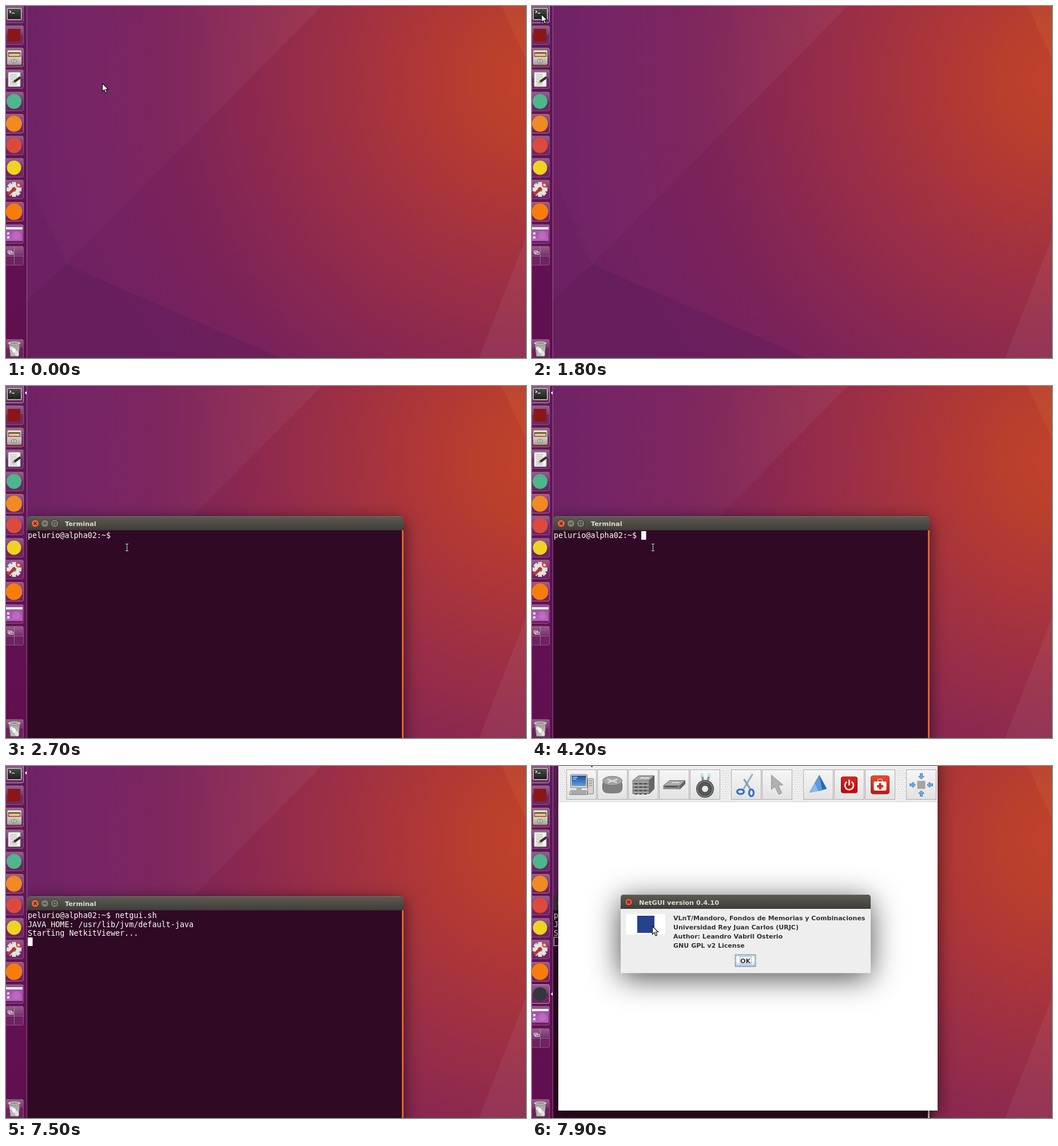
An HTML page with a canvas that plays this animation: 909 px wide and 616 px high, repeating every 8000 ms.

```html
<!DOCTYPE html>
<html lang="en">
<head>
<meta charset="utf-8">
<title>Terminal session</title>
<style>
html, body { margin: 0; width: 100%; height: 100%; overflow: hidden; background: #5d0d4a; }
canvas { display: block; }
</style>
</head>
<body>
<canvas id="stage" width="909" height="616"></canvas>
<script>
const W = 909, H = 616, LOOP = 8000, STEP = 100;
const MONO = '13.38px "DejaVu Sans Mono", monospace';
const TITLE = 'bold 11.3px "DejaVu Sans", sans-serif';
const BOLD = 'bold 11.05px "DejaVu Sans", sans-serif';
const CELL = 8.06, LINE = 15.3;
const PROMPT = 'pelurio@alpha02:~$ ', COMMAND = 'netgui.sh ';
const OUTPUT = ['JAVA_HOME: /usr/lib/jvm/default-java', 'Starting NetkitViewer...'];
// [time, number of command characters]
const KEYS = [[4300, 1], [4400, 2], [4600, 3], [4700, 4], [4800, 5], [5000, 6],
  [5200, 7], [5400, 8], [5600, 9], [6100, 8], [6700, 10]];

const screen = document.getElementById('stage').getContext('2d');
let g = screen;

function rect(x, y, w, h, fill) { g.fillStyle = fill; g.fillRect(x, y, w, h); }
function box(x, y, w, h, r, fill, stroke) {
  g.beginPath();
  g.roundRect(x, y, w, h, r);
  paint(fill, stroke);
}
function paint(fill, stroke, width = 1) {
  if (fill) { g.fillStyle = fill; g.fill(); }
  if (stroke) { g.strokeStyle = stroke; g.lineWidth = width; g.stroke(); }
}
function poly(points, fill, stroke, width) {
  g.beginPath();
  for (let i = 0; i < points.length; i += 2) g.lineTo(points[i], points[i + 1]);
  g.closePath();
  paint(fill, stroke, width);
}
function oval(x, y, rx, ry, fill, stroke, width) {
  g.beginPath();
  g.ellipse(x, y, rx, ry, 0, 0, 2 * Math.PI);
  paint(fill, stroke, width);
}
function disc(x, y, r, fill, stroke, width) { oval(x, y, r, r, fill, stroke, width); }
function line(x1, y1, x2, y2, color, width = 1) {
  g.beginPath(); g.moveTo(x1, y1); g.lineTo(x2, y2);
  paint(null, color, width);
}
function text(s, x, y, font, color, align = 'left') {
  g.font = font; g.fillStyle = color; g.textAlign = align;
  g.fillText(s, x, y);
}
function fade(y1, y2, ...colors) {
  const f = g.createLinearGradient(0, y1, 0, y2);
  colors.forEach((c, i) => f.addColorStop(i / (colors.length - 1), c));
  return f;
}
function shadow(x, y, w, h, blur, alpha, dy) {
  g.save();
  g.beginPath(); g.rect(0, 0, W, H); g.rect(x, y, w, h); g.clip('evenodd');
  g.shadowColor = `rgba(0,0,0,${alpha})`;
  g.shadowBlur = blur; g.shadowOffsetY = dy;
  rect(x, y, w, h, '#000');
  g.restore();
}
function layer(draw) {
  const c = document.createElement('canvas');
  c.width = W; c.height = H;
  g = c.getContext('2d');
  draw();
  g = screen;
  return c;
}

function wallpaper() {
  const glow = g.createRadialGradient(930, 130, 0, 930, 130, 900);
  [[0, '#bf422a'], [.1, '#bb402c'], [.22, '#b03835'], [.38, '#9f3043'], [.57, '#8b2850'],
   [.72, '#7a2359'], [.87, '#742161'], [1, '#6e2060']].forEach(s => glow.addColorStop(...s));
  rect(0, 0, W, H, glow);
  const sheen = g.createLinearGradient(37, 0, 552, 0);
  sheen.addColorStop(0, 'rgba(115,45,125,.16)');
  sheen.addColorStop(.4, 'rgba(180,90,150,.06)');
  sheen.addColorStop(1, 'rgba(255,255,255,.05)');
  poly([0, 0, 552, 0, 105, 452, 37, 515, 0, 549], sheen);
  poly([37, 300, 105, 452, 37, 515], 'rgba(85,30,85,.13)');
  poly([37, 515, 105, 452, 480, 616, 37, 616], 'rgba(84,26,86,.32)');
  poly([866, 0, 909, 0, 909, 92], 'rgba(255,190,80,.07)');
  poly([909, 405, 909, 616, 827, 616], 'rgba(255,255,255,.05)');
}

// Launcher icons, each drawn around (14, 0)
function plainDisc(r, color) { return () => disc(14, 0, r, color); }
function terminalIcon() {
  box(1.5, -9.5, 26, 21, 2, '#c9c9c4', '#8d8d88');
  rect(3, -8, 23, 18, fade(-8, 10, '#4a4a48', '#1e1e1c'));
  line(6, -5, 9, -3, '#fff', 1.2); line(9, -3, 6, -1, '#fff', 1.2);
  line(10, -.5, 15, -.5, '#fff', 1.2);
}
function filesIcon() {
  box(2, -13, 25, 26, 2, fade(-13, 13, '#e6e3dd', '#9b978f'), '#77736c');
  rect(4, -9, 21, 9, '#5d4b3c');
  rect(5, -7, 19, 5, '#ee9a4d');
  rect(5, -5, 19, 1, '#fff3e0');
  rect(2, -1, 25, 13, fade(-1, 12, '#d6d3cd', '#a9a59e'));
  box(10, 4, 8, 5, 1.5, '#eee', '#5e5b55');
  line(12, 6.5, 16, 6.5, '#444');
}
function notesIcon() {
  box(4, -12, 21, 25, 1, '#f3f3f0', '#b3b3ae');
  for (let y = -8; y < 11; y += 3) line(7, y, 19, y, '#aaa');
  poly([11, 7, 13, 3, 24, -5, 27, -2, 16, 6], '#33312e');
  poly([11, 7, 13, 3, 16, 6], '#d8b27c');
}
function gearIcon() {
  g.save(); g.translate(14, 0);
  for (let i = 0; i < 8; i++) { g.rotate(Math.PI / 4); rect(-3.5, -13, 7, 8, '#deddd9'); }
  disc(0, 0, 10, '#e6e5e1'); disc(0, 0, 4, '#8d7488');
  g.restore();
  line(4, 9, 16, -3, '#b5372c', 5); line(16, -3, 22, -9, '#d9d5d0', 3);
  disc(22, -8, 3.5, null, '#c9402f', 2);
}
function desktopIcon() {
  rect(0, -12, 29, 24, fade(-12, 12, '#9b4fa3', '#b565bb'));
  rect(0, -12, 29, 4, '#f1eef0');
  disc(18, 2, 7, 'rgba(225,130,215,.35)');
  rect(2, -3, 4, 4, '#e5dce9'); rect(2, 4, 4, 4, '#e5dce9');
}
function gridIcon() {
  line(14.5, -16, 14.5, 16, 'rgba(255,255,255,.3)');
  line(-3, .5, 31, .5, 'rgba(255,255,255,.3)');
  g.strokeStyle = '#e5dfe4'; g.lineWidth = 1;
  g.strokeRect(3.5, -8.5, 6, 4); g.strokeRect(5.5, -6.5, 7, 4);
}
function binIcon() {
  poly([5, -10, 24, -10, 22, 13, 8, 13], fade(-10, 13, '#a5a2a1', '#d8d6d5'), '#7d7879');
  for (let x = 8; x < 23; x += 3) line(x, -9, x * .75 + 3.6, 13, '#8f8b8b', .7);
  for (let i = 0; i < 7; i++) disc(10 + i * 4.7 % 10, -1 + i * 5.3 % 12, 3, i % 2 ? '#fafafa' : '#e2e1e1');
  oval(14.5, -10, 11, 3, '#e3e1df', '#8a8686');
  oval(14.5, -10, 8, 1.4, '#8a8585');
}
const ICONS = [terminalIcon, () => rect(3, -11, 22, 22, '#8c1616'), filesIcon, notesIcon,
  plainDisc(13, '#4fb58b'), plainDisc(14, '#f08a22'), plainDisc(13.5, '#dc4a3d'),
  plainDisc(12.5, '#f0d320'), gearIcon, plainDisc(14.5, '#f67d0c'), desktopIcon, gridIcon];
const RUNNING = [2, 5, 9];

function tile(y, icon, lit) {
  g.save(); g.translate(0, y);
  box(-3.5, -16.5, 34, 33, 3, 'rgba(255,255,255,.08)', lit || 'rgba(230,190,225,.32)');
  rect(-3, -16, 33, 15, fade(-16, -1, 'rgba(255,255,255,.26)', 'rgba(255,255,255,.08)'));
  icon();
  g.restore();
}
function pip(y) { poly([33, y, 36, y - 3, 36, y + 3], '#fff'); }
function launcher(t) {
  rect(0, 0, 36, H, fade(0, H, '#5f1a58', '#621257', '#600f4e'));
  rect(36, 0, 1, H, 'rgba(235,200,230,.36)');
  const push = t >= 7900 ? 38.6 : t >= 7800 ? 12 : 0;
  ICONS.forEach((icon, i) => {
    const lit = RUNNING.includes(i) ? 'rgba(240,130,100,.75)'
      : i === 0 && t >= 1600 ? 'rgba(255,225,250,.65)' : null;
    tile(Math.round(12.5 + 38.6 * i + (i > 9 ? push : 0)), icon, lit);
  });
  tile(600, binIcon);
  if (t >= 1900 && t < 7800) pip(12);
  if (t >= 7900) {
    tile(399, plainDisc(12, '#33363a'), 'rgba(255,225,250,.65)');
    pip(399);
  } else if (t >= 7800) {
    box(8.5, 381.5, 11, 11, 1, 'rgba(255,255,255,.18)', 'rgba(255,255,255,.3)');
    disc(14, 387, 3, '#33363a');
  }
}

function closeButton(x, y, r, fill) {
  disc(x, y, r, fill, '#37352f');
  line(x - 2.5, y - 2.5, x + 2.5, y + 2.5, '#4b2318', 1.2);
  line(x + 2.5, y - 2.5, x - 2.5, y + 2.5, '#4b2318', 1.2);
}
function titleBar(x, y, w, h, focus) {
  box(x, y, w, h, [5, 5, 0, 0], focus ? fade(y, y + h, '#5d5b53', '#3e3d38') : '#3c3b37');
  if (focus) line(x + 5, y + .5, x + w - 5, y + .5, '#75736b');
}
function terminal(t) {
  const focus = t < 7800;
  shadow(37, 230, 658, 400, focus ? 26 : 12, .6, 4);
  titleBar(37, 228, 658, 25, focus);
  closeButton(51, 240.5, 6.8, focus ? '#e8603c' : '#6d6b64');
  for (const x of [68, 85]) disc(x, 240.5, 6.8, '#7d7a72', '#37352f');
  line(65, 240.5, 71, 240.5, '#3b3934', 1.2);
  g.strokeStyle = '#3b3934'; g.strokeRect(82.5, 238, 5, 5);
  text('Terminal', 103, 245, TITLE, focus ? '#dfdbd2' : '#85827a');
  rect(37, 252.5, 658, 364, '#300a24');
  rect(692, 252.5, 3, 364, focus ? '#d9653f' : '#cbc6c6');

  let typed = 0;
  for (const [at, n] of KEYS) if (t >= at) typed = n;
  let row = 0, col = PROMPT.length + typed;
  if (t >= 7300) { row = 1 + Math.min(2, Math.floor((t - 7300) / STEP)); col = 0; }
  const lines = [PROMPT + COMMAND.slice(0, typed), ...OUTPUT.slice(0, Math.max(0, row - 1))];
  lines.forEach((s, i) => text(s, 38, 266.2 + LINE * i, MONO, '#fff'));

  const off = (t >= 2400 && t < 3000) || (t >= 3600 && t < 4200);
  const x = 38 + CELL * col, y = 254 + LINE * row;
  if (!focus) {
    g.strokeStyle = '#fff'; g.lineWidth = 1;
    g.strokeRect(38.5, Math.round(y) + .5 - 1, 8, 15);
  } else if (!off) rect(Math.round(x), Math.round(y), 8.5, 15, '#fff');
}

// Toolbar icons, each drawn around its button centre
function computer() {
  box(-19, -18, 29, 23, 1, '#d9d8d0', '#77756e');
  rect(-17, -16, 25, 18, fade(-16, 2, '#1c4f9c', '#5d9ee0'));
  rect(-15, -14, 8, 1.5, '#bcd8f5'); rect(-15, -11, 6, 1.5, '#bcd8f5');
  rect(-9, 5, 9, 4, '#a9a79f');
  box(11, -11, 10, 27, 1, '#d4d2ca', '#85837c');
  for (let y = -7; y < 4; y += 4) line(13, y, 19, y, '#77756e');
  poly([-19, 10, 9, 10, 11, 17, -21, 17], '#d9d8d0', '#77756e');
  for (let y = 12; y < 17; y += 2) line(-18, y, 8, y, '#6d7a8c');
}
function router() {
  box(-17, -8, 34, 22, 8, '#808080', '#656565');
  oval(0, 8, 17, 7, '#808080');
  oval(0, -7, 17, 8, '#a5a5a5', '#747474');
  line(-9, -10, 8, -4, '#e0e0e0', 2); line(9, -10, -8, -4, '#e0e0e0', 2);
}
function slab(h) {
  poly([-19, -h / 2 + 4, -8, -h / 2 - 5, 19, -h / 2 - 5, 10, -h / 2 + 4], '#aaa', '#666');
  poly([10, -h / 2 + 4, 19, -h / 2 - 5, 19, h / 2 - 4, 10, h / 2 + 5], '#666', '#555');
  rect(-19, -h / 2 + 4, 29, h + 1, '#858585');
}
function rack() {
  slab(22);
  for (let y = -5; y < 14; y += 6) {
    line(-18, y, 10, y, '#d0d0d0');
    for (let x = -15; x < 8; x += 8) rect(x, y + 2, 5, 2, '#4d4d4d');
  }
  line(-5, -12, 10, -12, '#e3e3e3', 2);
}
function hub() { slab(5); line(-16, 3, 6, 3, '#4d4d4d', 2); line(-4, -4, 9, -4, '#d8d8d8', 2); }
function cable() {
  line(-5, -16, -3, -4, '#8d959a', 4); line(7, -16, 4, -4, '#8d959a', 4);
  rect(-8, -20, 5, 6, '#bfe2ea'); rect(5, -20, 5, 6, '#bfe2ea');
  disc(0, 7, 10.5, null, '#4c4f50', 10);
  disc(0, 7, 13, null, '#858a8b', 1.5);
  disc(0, 7, 8.5, null, '#6d7172');
}
function scissors() {
  line(11, -19, -5, 8, '#b7c6d8', 3.5); line(-4, -10, 8, 9, '#8fa3bb', 3.5);
  line(11, -19, -5, 8, '#6f88a8', 1);
  oval(-10, 12, 6, 4, null, '#2f6fce', 3.2);
  oval(9, 14, 4, 6, null, '#2f6fce', 3.2);
}
function pointer() {
  poly([-10, -17, -10, 8, -4, 3, 3, 17, 8, 14, 2, 1, 10, 0], '#b1b1b1', '#8f8f8f');
}
function peaks() {
  poly([-15, 13, 2, -17, 7, 9], '#5b9be0', '#3c78bb');
  poly([2, -17, 15, 7, 7, 9], '#2f69ad');
  poly([-15, 13, -6, -3, 0, 11], '#86b9ec');
}
function redTile() { box(-14, -14, 28, 28, 3, fade(-14, 14, '#e0211d', '#bd0808'), '#980808'); }
function power() {
  redTile();
  g.beginPath(); g.arc(0, 1, 7.5, -1, Math.PI + 1);
  paint(null, '#fff', 2.6);
  line(0, -9, 0, 1, '#fff', 2.6);
}
function medkit() {
  box(-16, -16, 32, 32, 4, fade(-16, 16, '#ea4b2e', '#c5150c'), '#a3382a');
  box(-4, -10, 8, 6, 2, null, '#fff');
  box(-11, -6, 22, 16, 2, '#fff');
  rect(-2, -3, 4, 11, '#d4241a'); rect(-5.5, .5, 11, 4, '#d4241a');
}
function spread() {
  rect(-7, -7, 14, 14, '#a5a5a5');
  g.save();
  for (let i = 0; i < 4; i++) {
    poly([0, -10, -5, -15, -2, -15, -2, -20, 2, -20, 2, -15, 5, -15], '#72a9da', '#4b84b8');
    g.rotate(Math.PI / 2);
  }
  g.restore();
}
const TOOLS = [[60, computer], [114, router], [168, rack], [222, hub], [276, cable], [348, scissors],
  [402, pointer], [474, peaks], [528, power], [582, medkit], [654, spread]];

function appWindow() {
  rect(46, 0, 663, 603, '#fff');
  rect(46, 0, 663, 62, '#eee');
  text('File  Help', 52, -.5, BOLD, '#222');
  for (const [x, w] of [[48, 10], [331, 14], [457, 14], [637, 14]]) {
    for (let y = 8; y < 60; y += 4) {
      for (let i = 0; i < w; i += 4) rect(x + i + (y / 4 % 2) * 2, y, 1, 1, '#c3c3c3');
    }
  }
  for (const [x, icon] of TOOLS) {
    rect(x, 6, 53, 53, fade(6, 59, '#f6f6f6', '#e2e2e2'));
    g.strokeStyle = '#b0a9b0'; g.lineWidth = 1;
    g.strokeRect(x + .5, 6.5, 52, 52);
    g.save(); g.translate(x + 26.5, 33); icon(); g.restore();
  }
  rect(46, 62, 663, 1, '#cfcfcf');
}

function dialog() {
  shadow(155, 227, 436, 135, 52, .72, 8);
  titleBar(155, 225, 437, 25, true);
  closeButton(169, 238, 6.5, '#e05a39');
  text('NetGUI version 0.4.10', 187, 242.5, TITLE, '#dfdbd2');
  rect(155, 250, 437, 112.5, '#eee');
  rect(164, 259, 69, 36, '#fff');
  rect(184, 262, 30, 30, '#24418c');
  ['VLnT/Mandoro, Fondos de Memorias y Combinaciones', 'Universidad Rey Juan Carlos (URJC)',
   'Author: Leandro Vabril Osterio', 'GNU GPL v2 License']
    .forEach((s, i) => text(s, 247, 270 + 16.1 * i, BOLD, '#333'));
  box(355, 330, 36, 21, 0, fade(330, 351, '#dde8f3', '#fff', '#b8cfe5'), '#7a8a99');
  g.strokeStyle = '#9fb6cd'; g.strokeRect(356.5, 331.5, 33, 18);
  g.strokeStyle = '#a9bfd5'; g.strokeRect(363.5, 333.5, 20, 13);
  text('OK', 373, 344.5, BOLD, '#333', 'center');
}

function arrow(x, y) {
  g.save(); g.translate(x + .5, y + .5);
  poly([0, 0, 0, 14, 3.2, 11, 5.6, 16.5, 8, 15.5, 5.7, 10.2, 10, 10], '#fff', '#111', 1.2);
  g.restore();
}
function beam(x, y) {
  const bar = (color, w) => {
    line(x, y - 6, x, y + 6, color, w);
    line(x - 2.5, y - 6, x + 2.5, y - 6, color, w);
    line(x - 2.5, y + 6, x + 2.5, y + 6, color, w);
  };
  bar('#000', 2.4); bar('#e8e8e8', 1);
}
function glide(t, t1, t2, a, b) {
  const p = Math.min(1, Math.max(0, (t - t1) / (t2 - t1)));
  const e = p * p * (3 - 2 * p);
  return [a[0] + (b[0] - a[0]) * e, a[1] + (b[1] - a[1]) * e].map(Math.round);
}
function mouse(t) {
  if (t >= 7800) arrow(210, 280);
  else if (t >= 4300) return;
  else if (t >= 2700) beam(211.5, 282.5);
  else if (t >= 2600) beam(177.5, 278.5);
  else if (t >= 2500) beam(255.5, 261.5);
  else if (t >= 1900) arrow(...glide(t, 1900, 2400, [16, 14], [379, 191]));
  else arrow(...glide(t, 200, 1100, [168, 135], [16, 14]));
}

const backdrop = layer(wallpaper), app = layer(appWindow);

function draw(t) {
  g.drawImage(backdrop, 0, 0);
  if (t >= 1900) terminal(t);
  if (t >= 7900) {
    shadow(46, -20, 663, 623, 26, .6, 4);
    g.drawImage(app, 0, 0);
    dialog();
  } else if (t >= 7800) {
    shadow(48, -20, 659, 621, 16, .5, 3);
    g.save();
    g.globalAlpha = .9;
    g.translate(377.5, 300); g.scale(.994, .994); g.translate(-377.5, -300);
    g.drawImage(app, 0, 0);
    // the part of the window that scaling pulls below the top edge
    rect(46, -2, 663, 2, '#eee');
    g.restore();
  }
  launcher(t);
  mouse(t);
}

let start, last = -1;
function frame(now) {
  start ??= now;
  const t = Math.floor((now - start) % LOOP / STEP) * STEP;
  if (t !== last) draw(last = t);
  requestAnimationFrame(frame);
}
requestAnimationFrame(frame);
</script>
</body>
</html>
```
